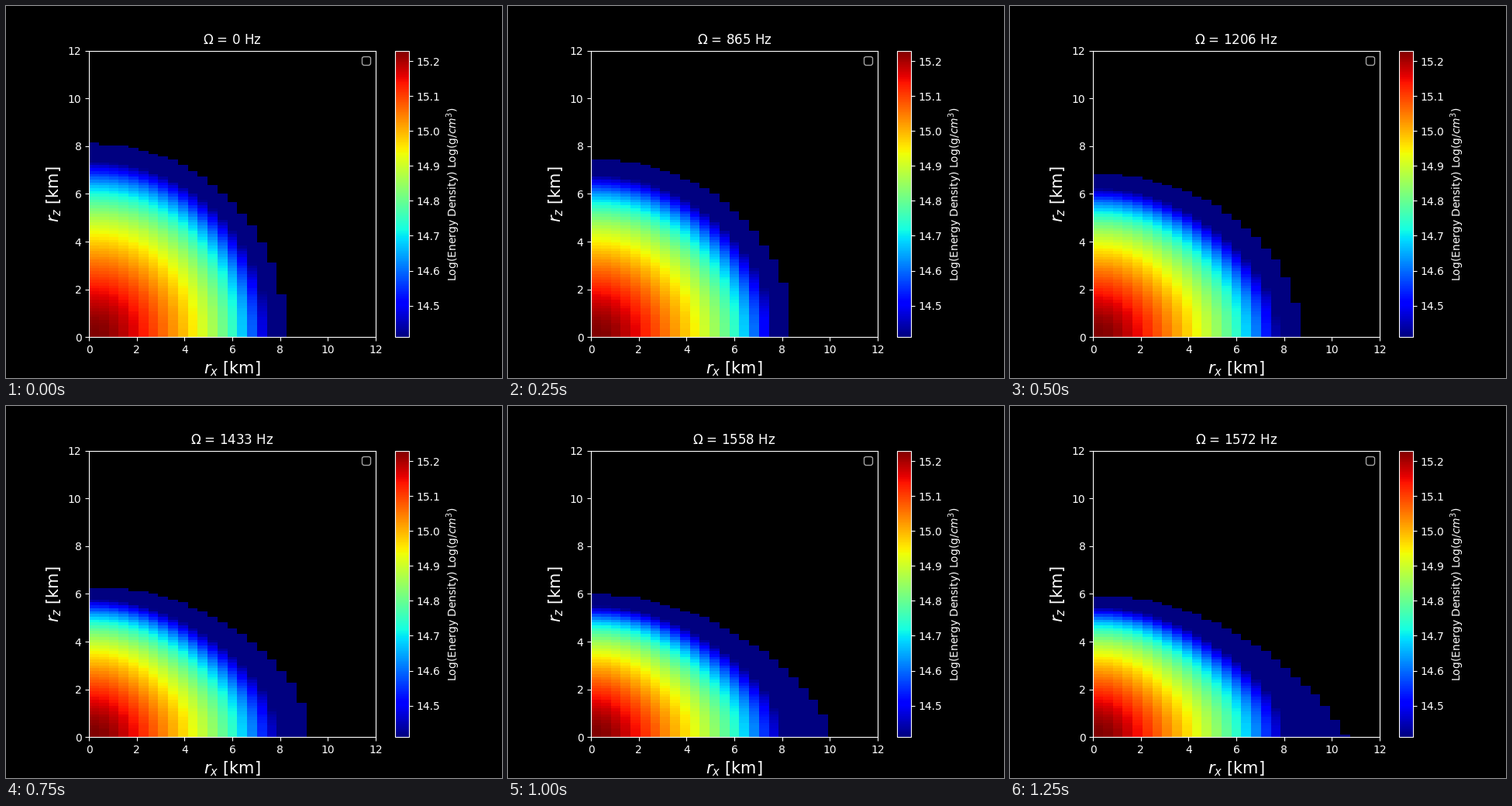
Write a matplotlib script that moves like this. It is 640 px wide and 480 px high and loops after 1500 ms.

```python
import numpy as np
import matplotlib.pyplot as plt
from matplotlib.animation import FuncAnimation

plt.style.use("dark_background")
plt.rcParams["font.family"] = "DejaVu Sans"

SIZE = 12                        # km shown on each axis
NX, NZ = 29, 100                 # cells across and up
LOW, HIGH = 14.41, 15.23         # range of the log density
REST = 8.044                     # radius of the star at rest, km
CORE = 7.2                       # radius of the dense part at rest, km

# spin rate in Hz -> equatorial radius in km
SPINS = {0: REST, 865: 8.25, 1206: 8.48, 1433: 8.975, 1558: 9.77, 1572: 10.36}

x_edges = np.linspace(0, SIZE, NX + 1)
z_edges = np.linspace(0, SIZE, NZ + 1)
x, z = np.meshgrid(x_edges[:-1], z_edges[:-1])


def surface(polar, equator):
    """Height of the surface over x: an ellipse that grows a cusp."""
    u = (x / equator) ** 2
    v = (equator / polar - 1) ** 2 * u
    shape = (1 - u) * (1 - 1.2 * v - 2.2 * v**4)
    return np.where(u < 1, polar * np.sqrt(np.clip(shape, 0, None)), 0)


def rest_radius(s):
    """Radius of the same density at rest, for a polar flattening s."""
    r = np.hypot(x, z)
    for _ in range(8):
        t = np.clip(r / CORE, 0, 1) ** 2
        x2 = (x / (1 - s * (0.5 - 0.73 * t))) ** 2
        z2 = (z / (1 - s * (0.72 + 0.24 * t))) ** 2
        pinch = 1.8 * s * x2 * z2 / (x2 + z2 + 1e-9)
        r = np.sqrt(x2 + z2 + pinch)
    return r


def log_density(r):
    """Round peak, nearly linear slope, steep fall at the edge."""
    return HIGH - 0.138 * (np.hypot(1, r / 1.5) - 1) - 0.255 * (r / CORE) ** 6


def star_field(spin):
    polar = REST - 0.88e-6 * spin**2
    outside = z >= surface(polar, SPINS[spin])
    density = log_density(rest_radius(1 - polar / REST))
    return np.ma.array(density, mask=outside)


fields = {spin: star_field(spin) for spin in SPINS}

fig, ax = plt.subplots(figsize=(6.4, 4.8), dpi=100)
mesh = ax.pcolormesh(x_edges, z_edges, fields[0], cmap="jet",
                     vmin=LOW, vmax=HIGH)
ax.set_xlim(0, SIZE)
ax.set_ylim(0, SIZE)
ax.set_aspect("equal")
ax.set_xlabel("$r_x$ [km]", fontsize=15)
ax.set_ylabel("$r_z$ [km]", fontsize=15)
ax.legend([], [], loc="upper right")
bar = fig.colorbar(mesh, ax=ax)
bar.set_label("Log(Energy Density) Log(g/$cm^3$)")
title = ax.set_title("")


def update(spin):
    mesh.set_array(fields[spin])
    title.set_text(rf"$\Omega$ = {spin} Hz")
    return mesh, title


anim = FuncAnimation(fig, update, frames=list(SPINS), interval=250,
                     repeat=True, repeat_delay=0, blit=False)
plt.show()
```
